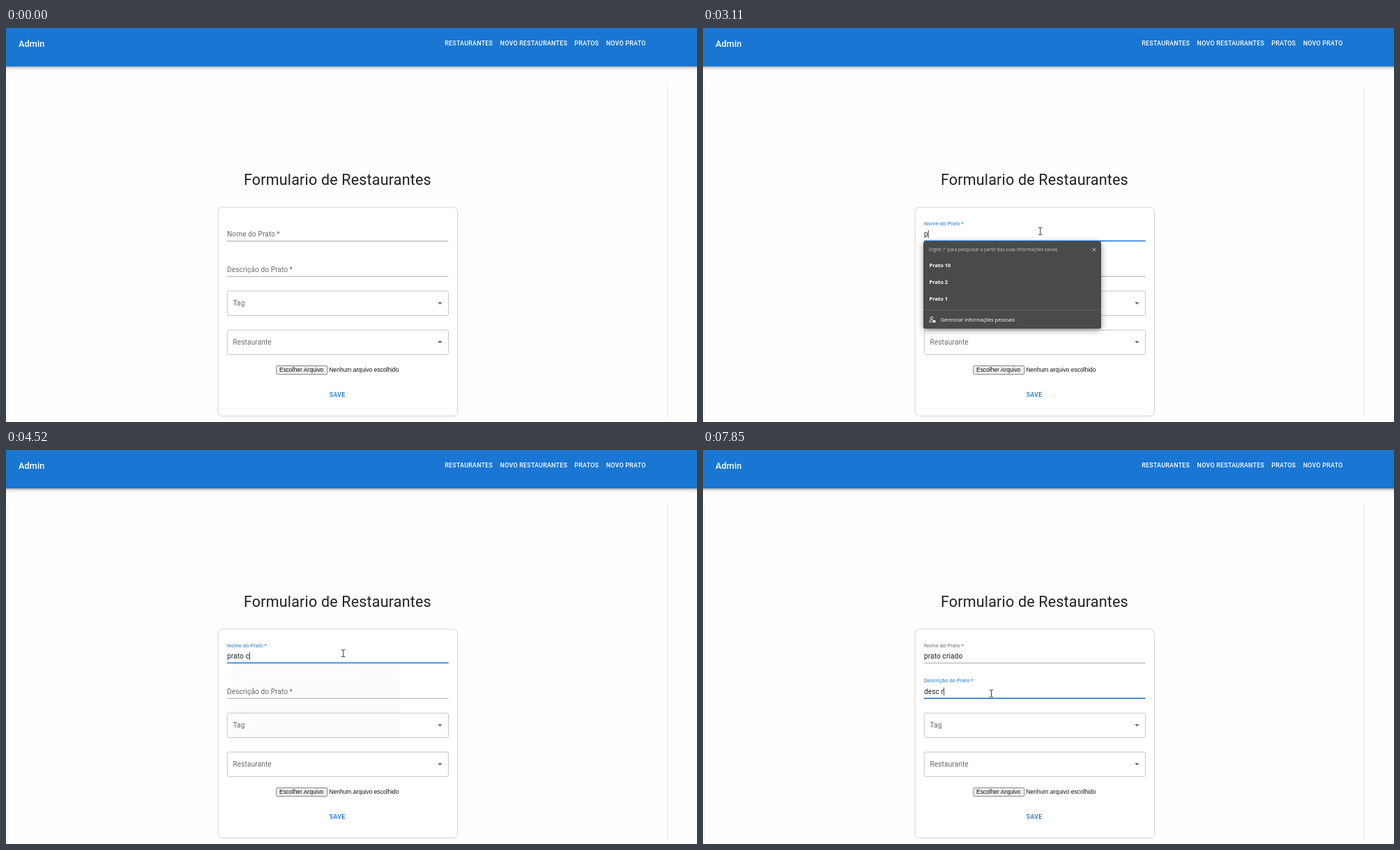
These frames come from a looping animation (991x565 px, 8000 ms). An HTML page:

```html
<!DOCTYPE html>
<html lang="pt">
<head>
<meta charset="utf-8">
<title>Admin</title>
<style>
html, body { margin: 0; width: 100%; height: 100%; overflow: hidden; background: #fefefe; }
svg { display: block; font-family: Roboto, sans-serif; }
text { white-space: pre; }
.nav, .save { font-size: 8.88px; font-weight: 500; letter-spacing: .254px; }
.nav, .brand { fill: #fff; }
.brand { font-size: 12.68px; font-weight: 500; letter-spacing: .095px; }
.title { font-size: 21.55px; letter-spacing: .158px; fill: #212121; }
.body { font-size: 10.15px; letter-spacing: .095px; }
.hint { fill: #6a6a6a; }
.value { fill: #212121; }
.save { fill: #1976d2; }
.file { font: 8.45px "Liberation Sans", Arial, sans-serif; fill: #111; }
.popup { font-family: "Open Sans", sans-serif; fill: #fff; filter: drop-shadow(0 2px 5px rgba(0,0,0,.4)); }
.bar { filter: drop-shadow(0 1px 1.5px rgba(0,0,0,.3)) drop-shadow(0 1px 3px rgba(0,0,0,.22)); }
</style>
</head>
<body>
<svg id="stage" width="991" height="565" viewBox="0 0 991 565"></svg>
<script>
const LOOP = 8000, BLUE = '#1976d2', GREY = '#6a6a6a';
const LEFT = 317, RIGHT = 634.5, MID = (LEFT + RIGHT) / 2;
const stage = document.getElementById('stage');

function el(tag, attrs, parent = stage, content = '') {
  const node = document.createElementNS('http://www.w3.org/2000/svg', tag);
  set(node, attrs);
  node.textContent = content;
  parent.appendChild(node);
  return node;
}
function set(node, attrs) {
  for (const key in attrs) node.setAttribute(key, attrs[key]);
}
const text = (x, y, cls, content, parent) => el('text', { x, y, class: cls }, parent, content);
const rect = (x, y, width, height, attrs, parent) => el('rect', { x, y, width, height, ...attrs }, parent);
const clamp = v => Math.max(0, Math.min(1, v));
const easeOut = v => 1 - (1 - clamp(v)) ** 3;
const lastAt = (list, t) => list.filter(item => item[0] <= t).pop();

// Page
rect(2, 78, 1, 485, { fill: '#efefef' });
rect(948, 78, 1, 485, { fill: '#efefef' });
rect(-10, -10, 1011, 65, { fill: BLUE, class: 'bar' });
text(18, 27.4, 'brand', 'Admin');
[[629.3, 'RESTAURANTES'], [708.6, 'NOVO RESTAURANTES'], [815.3, 'PRATOS'], [860.7, 'NOVO PRATO']]
  .forEach(([x, label]) => text(x, 25.3, 'nav', label));
text(341, 225, 'title', 'Formulario de Restaurantes');
rect(304, 257, 343.5, 299.5, { rx: 6.5, fill: '#fff', 'fill-opacity': .4, stroke: '#cfcfcf', 'stroke-width': .9 });

function select(y, label) {
  rect(LEFT + .3, y, RIGHT - LEFT - .3, 35.2, { rx: 2.5, fill: 'none', stroke: '#c0c0c0', 'stroke-width': .9 });
  text(325.5, y + 21, 'body hint', label);
  el('path', { d: `M619.2 ${y + 16}h6.4l-3.2 3.2z`, fill: '#666' });
}
select(377.2, 'Tag');
select(433.1, 'Restaurante');
rect(387.8, 484.4, 73, 12.2, { rx: 1.5, fill: '#efefef', stroke: '#777', 'stroke-width': .9 });
text(392, 493.4, 'file', 'Escolher Arquivo');
text(463.5, 493.4, 'file', 'Nenhum arquivo escolhido');
text(463.8, 528.7, 'save', 'SAVE');

// Text field with floating label, animated underline and caret
function field(y, label, { hover, focus, blur, typed }) {
  const line = rect(LEFT, y + 6.2, RIGHT - LEFT, .8, {});
  const accent = rect(LEFT, y + 5.8, 0, 1.5, { fill: BLUE });
  const name = text(0, 0, 'body', label + '\u2009*');
  const value = text(LEFT, y, 'body value', '');
  const caret = rect(0, y - 9, .8, 11.5, { fill: '#111' });
  return t => {
    const up = easeOut((t - focus) / 200);
    const active = t >= focus && t < blur;
    const hot = t >= hover && t < focus;
    const wide = (RIGHT - LEFT) / 2 * (up - easeOut((t - blur) / 200));
    const [since, content] = lastAt(typed, t) || [0, ''];
    set(line, { y: y + (hot ? 5.8 : 6.2), height: hot ? 1.4 : .8, fill: hot ? '#222' : '#929292' });
    set(accent, { x: MID - wide, width: 2 * wide });
    set(name, {
      transform: `translate(${LEFT} ${y - 16.3 * up}) scale(${1 - .25 * up})`,
      fill: active ? BLUE : GREY
    });
    value.textContent = content;
    const blinkOn = (t - since) % 1060 < 530;
    set(caret, {
      x: LEFT + (content ? value.getComputedTextLength() : 0),
      opacity: active && blinkOn ? 1 : 0
    });
  };
}
const fields = [
  field(298.8, 'Nome do Prato', {
    hover: 1600, focus: 1790, blur: 5990,
    typed: [[1790, ''], [2970, 'p'], [3310, 'pr'], [3380, 'pra'], [3450, 'prac'], [3780, 'pra'],
      [4120, 'prat'], [4250, 'prato'], [4320, 'prato '], [4380, 'prato c'], [4650, 'prato cr'],
      [4920, 'prato cri'], [5000, 'prato criad'], [5130, 'prato criado']]
  }),
  field(349.6, 'Descrição do Prato', {
    hover: 5860, focus: 5990, blur: LOOP + 1,
    typed: [[5990, ''], [6520, 'd'], [6785, 'de'], [7120, 'des'], [7320, 'desc'],
      [7580, 'desc r'], [7650, 'desc re'], [7850, 'desc r']]
  })
];

// Autofill popup; each span is [open, close, fade in, fade out]
function popup(top, head, rows, { pitch, weight, footer, spans }) {
  const g = el('g', { class: 'popup' });
  const last = top + 34.3 + pitch * (rows.length - 1);
  const bottom = last + (footer ? 42.7 : 13);
  rect(316, top, 255, bottom - top, { rx: 2.5, fill: '#4a4a4a' }, g);
  set(text(324, top + 14.2, '', head, g), { 'font-size': 6.57, fill: '#c4c4c4' });
  el('path', { d: `M558.3 ${top + 9.2}l5.2 5.2m0 -5.2l-5.2 5.2`, stroke: '#e4e4e4', 'stroke-width': .8 }, g);
  rows.forEach((row, i) => set(text(324.5, top + 37 + pitch * i, '', row, g),
    { 'font-size': 7.5, 'font-weight': weight }));
  if (footer) {
    rect(316, bottom - 27.3, 255, .7, { fill: '#6d6d6d' }, g);
    const y = bottom - 13;
    el('circle', { cx: 328, cy: y - 2.3, r: 1.9, fill: 'none', stroke: '#fff', 'stroke-width': .8 }, g);
    el('path', { d: `M328.5 ${y + 3.6}h-3.6v-1.4q0 -1.5 2 -1.5h1.8`, fill: 'none', stroke: '#fff', 'stroke-width': .8 }, g);
    rect(329.4, y + .7, 4, 3.4, { rx: .6 }, g);
    set(text(341, y + 2.6, '', 'Gerenciar informações pessoais', g), { 'font-size': 7.13 });
  }
  const cy = (top + bottom) / 2;
  return t => {
    const span = lastAt(spans, t);
    let alpha = 0;
    if (span) {
      const [open, close, fadeIn, fadeOut] = span;
      alpha = (1 - (1 - clamp((t - open) / fadeIn)) ** 2) * clamp(1 - (t - close) / fadeOut);
    }
    const k = .95 + .05 * alpha;
    set(g, {
      opacity: alpha,
      display: alpha ? 'inline' : 'none',
      transform: `translate(443.5 ${cy}) scale(${k}) translate(-443.5 ${-cy})`
    });
  };
}
const search = "Digite '/' para pesquisar a partir das suas informações salvas";
const stored = 'Dados armazenados';
const dishes = ['Prato 10', 'Prato 2', 'Prato 1'];
const popups = [
  popup(306, search, [...dishes, 'teste', 'dasdad', 'string 2'],
    { pitch: 26, weight: 700, footer: true, spans: [[1810, 3109, 150, 1]] }),
  popup(306, search, dishes,
    { pitch: 24.1, weight: 700, footer: true, spans: [[3109, 3465, 1, 150], [4110, 4373, 150, 150]] }),
  popup(357.3, stored, ['teste', 'Nareko Sushi 2', 'Ondavel', 'Cozinha da praça', 'dasdad', 'string 2'],
    { pitch: 21.67, weight: 400, spans: [[6010, 6695, 150, 150]] }),
  popup(357.3, stored, ['dasdad'],
    { pitch: 21.67, weight: 400, spans: [[6695, 6830, 150, 150]] })
];

// Mouse pointer
const shapes = {
  arrow: el('path', { d: 'M0 0v9.8l2.2 -2.1 1.6 3.8 1.7 -.7 -1.6 -3.7h3z', fill: '#fff', stroke: '#111', 'stroke-width': .8 }),
  beam: el('path', { d: 'M-2.6 -5h2l.6 .5 .6 -.5h2M0 -4.5v9M-2.6 5h2l.6 -.5 .6 .5h2', fill: 'none', stroke: '#222', 'stroke-width': .9 }),
  hand: el('path', {
    d: 'M-1 0q1 -1.2 2 0v4l4.4 1q1.2 .4 1 1.8l-.8 4.2v1.6h-5.6l-3.6 -5q.2 -1.6 1.6 -.6l1 1z',
    fill: '#fff', stroke: '#111', 'stroke-width': .8
  })
};
const path = [[70, 590, 541], [340, 760, 340], [600, 922, 120], [870, 889, 30], [940, 889, 30],
  [1070, 891, 31], [1210, 891, 31], [1290, 880, 52], [1500, 560, 215], [1680, 431.8, 291.5],
  [2040, 431.8, 291.5], [2310, 483.8, 291.5], [5650, 483.8, 291.5], [5980, 413.5, 349]];
const kinds = [[70, 'arrow'], [810, 'hand'], [1240, 'arrow'], [1600, 'beam'], [5730, 'arrow'],
  [5860, 'beam'], [6700, 'arrow'], [6950, 'beam']];

function pointer(t) {
  const kind = (lastAt(kinds, t) || [])[1];
  const i = Math.max(0, path.filter(p => p[0] <= t).length - 1);
  const a = path[i], b = path[i + 1] || a;
  const k = b === a ? 0 : clamp((t - a[0]) / (b[0] - a[0]));
  const x = a[1] + (b[1] - a[1]) * k, y = a[2] + (b[2] - a[2]) * k;
  for (const name in shapes) {
    set(shapes[name], { display: name === kind ? 'inline' : 'none', transform: `translate(${x} ${y})` });
  }
}

function draw(t) {
  fields.forEach(f => f(t));
  popups.forEach(p => p(t));
  pointer(t);
}
const start = performance.now();
function frame() {
  draw((performance.now() - start) % LOOP);
  requestAnimationFrame(frame);
}
frame();
</script>
</body>
</html>
```
